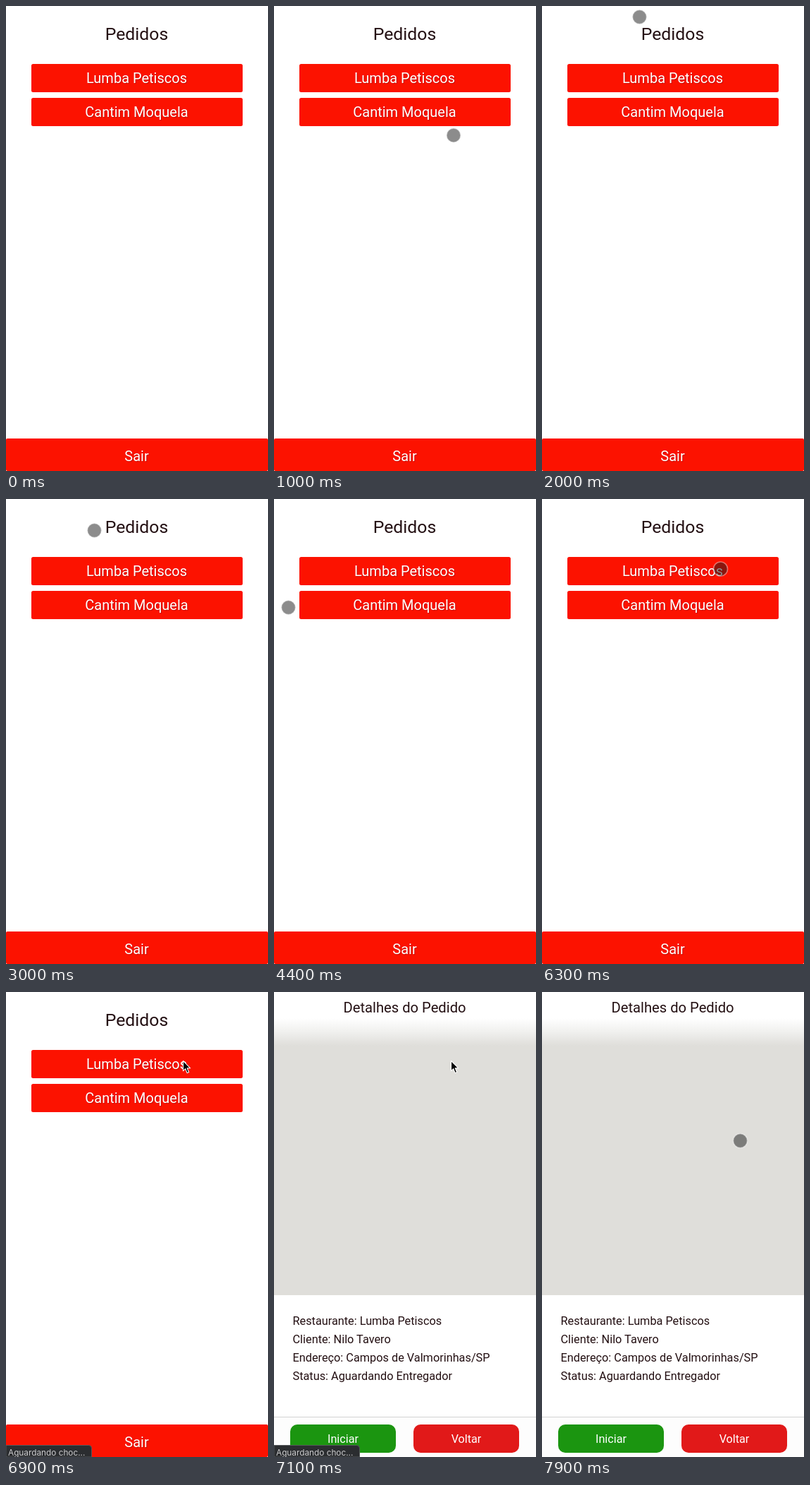
An HTML page for the animation above (8 s loop, 372x658 px).

```html
<!DOCTYPE html>
<html lang="pt-BR">
<head>
<meta charset="utf-8">
<title>Pedidos</title>
<style>
  html, body { margin: 0; width: 100%; height: 100%; overflow: hidden; background: #fff; }
  svg { display: block; width: 100%; height: 100%; }
  text { font-family: Roboto, "Open Sans", sans-serif; fill: #241013; }
  .mid { text-anchor: middle; }
  .red { fill: #fc1200; }
  .btn { font-size: 20px; fill: #fff; text-shadow: 1px 1px 1px rgba(70, 0, 0, .3); }
  .info { font-size: 16.3px; }
  .act { font-size: 16.2px; fill: #fff; }
  .wait { font-family: Inter, "Liberation Sans", sans-serif; font-size: 11.8px; fill: #cbcbcd; }
</style>
</head>
<body>
<svg viewBox="0 0 372 658" xmlns="http://www.w3.org/2000/svg">
  <defs>
    <linearGradient id="fade" x1="0" y1="0" x2="0" y2="1">
      <stop offset="0" stop-color="#fff"/>
      <stop offset=".5" stop-color="#f0f0ee"/>
      <stop offset="1" stop-color="#dfdeda"/>
    </linearGradient>
  </defs>
  <rect width="372" height="658" fill="#fff"/>

  <g id="list">
    <text class="mid" x="185.5" y="47.8" font-size="24.8">Pedidos</text>
    <rect class="red" x="36" y="82" width="300" height="40" rx="2.5"/>
    <rect class="red" x="36" y="130" width="300" height="40" rx="2.5"/>
    <rect id="tap" x="36" y="82" width="300" height="40" rx="2.5" opacity=".14"/>
    <rect class="red" y="612" width="372" height="46" rx="2"/>
    <text class="btn mid" x="185.5" y="109">Lumba Petiscos</text>
    <text class="btn mid" x="185.5" y="157">Cantim Moquela</text>
    <text class="btn mid" x="185.5" y="644">Sair</text>
  </g>

  <g id="detail">
    <text class="mid" x="185.5" y="29" font-size="20.2">Detalhes do Pedido</text>
    <rect y="75" width="372" height="354" fill="#dfdeda"/>
    <rect y="37" width="372" height="39" fill="url(#fade)"/>
    <text class="info" x="26.5" y="471">Restaurante: Lumba Petiscos</text>
    <text class="info" x="26.5" y="497">Cliente: Nilo Tavero</text>
    <text class="info" x="26.5" y="523">Endereço: Campos de Valmorinhas/SP</text>
    <text class="info" x="26.5" y="549">Status: Aguardando Entregador</text>
    <rect y="601" width="372" height="57" fill="#fdfdfd"/>
    <rect y="601" width="372" height="1" fill="#d2d2d2"/>
    <rect x="23" y="612" width="150" height="40" rx="10" fill="#1b9510"/>
    <rect x="198" y="612" width="150" height="40" rx="10" fill="#e11919"/>
    <text class="act mid" x="98" y="638">Iniciar</text>
    <text class="act mid" x="273" y="638">Voltar</text>
  </g>

  <g id="status">
    <path d="M0 641.5H117.5Q121.5 641.5 121.5 645.5V658H0Z" fill="#2b2d30" stroke="#55585b"/>
    <text class="wait" x="3" y="655.5">Aguardando choc...</text>
  </g>

  <circle id="touch" r="10" fill="#191919" fill-opacity=".5" stroke="#fff" stroke-opacity=".4" stroke-width="1.6"/>
  <path id="arrow" d="M251.5 97.5v14.2l3.2-3 2.5 5.9 2.5-1.1-2.5-5.7h4.5z" stroke="#fff" stroke-width="1.1" stroke-linejoin="round"/>
</svg>
<script>
const LOOP = 8000, STEP = 100;

// Each stroke passes its points at an even pace; the pointer rests between strokes.
const strokes = [
  { from: 400, gap: 300, points: [[123, 271], [204, 236], [255, 183], [286.5, 38.5]] },
  { from: 1600, gap: 200, points: [[286, 38], [256, 22], [138.5, 15.5], [136, 80],
    [176, 136], [242, 124], [215, 50], [125.5, 44.5]] },
  { from: 3000, gap: 350, points: [[125.5, 44.5], [236, 135], [188, 60], [60, 84], [20.5, 153.5]] },
  { from: 4400, gap: 200, points: [[20.5, 153.5], [44, 164], [50, 160]] },
  { from: 5600, gap: 350, points: [[75.5, 170.5], [184, 165], [253.5, 99]] },
  { from: 7400, gap: 500, points: [[256, 107], [281.5, 210.5]] }
];

const $ = id => document.getElementById(id);
const show = (id, on) => $(id).setAttribute("visibility", on ? "visible" : "hidden");

function spline(a, b, c, d, u) {
  return b + u / 2 * (c - a + u * (2 * a - 5 * b + 4 * c - d + u * (3 * (b - c) + d - a)));
}

function pointer(t) {
  const { from, gap, points } = strokes.filter(s => s.from <= t).pop() || strokes[0];
  const last = points.length - 1;
  const pos = Math.min(last, Math.max(0, (t - from) / gap));
  const i = Math.floor(pos);
  const at = n => points[Math.min(last, Math.max(0, n))];
  return [0, 1].map(k => spline(at(i - 1)[k], at(i)[k], at(i + 1)[k], at(i + 2)[k], pos - i));
}

function draw(ms) {
  const t = Math.floor(ms % LOOP / STEP) * STEP;
  const opened = t >= 7100;
  const arrow = t >= 6800 && t < 7500;
  const [x, y] = pointer(t);
  show("list", !opened);
  show("detail", opened);
  show("tap", t >= 6700 && t < 6900);
  show("status", t >= 6900 && t < 7500);
  show("arrow", arrow);
  show("touch", t >= 400 && !arrow);
  $("touch").setAttribute("transform", `translate(${x.toFixed(2)} ${y.toFixed(2)})`);
}

const start = performance.now();
function tick() {
  draw(performance.now() - start);
  requestAnimationFrame(tick);
}
tick();
</script>
</body>
</html>
```
